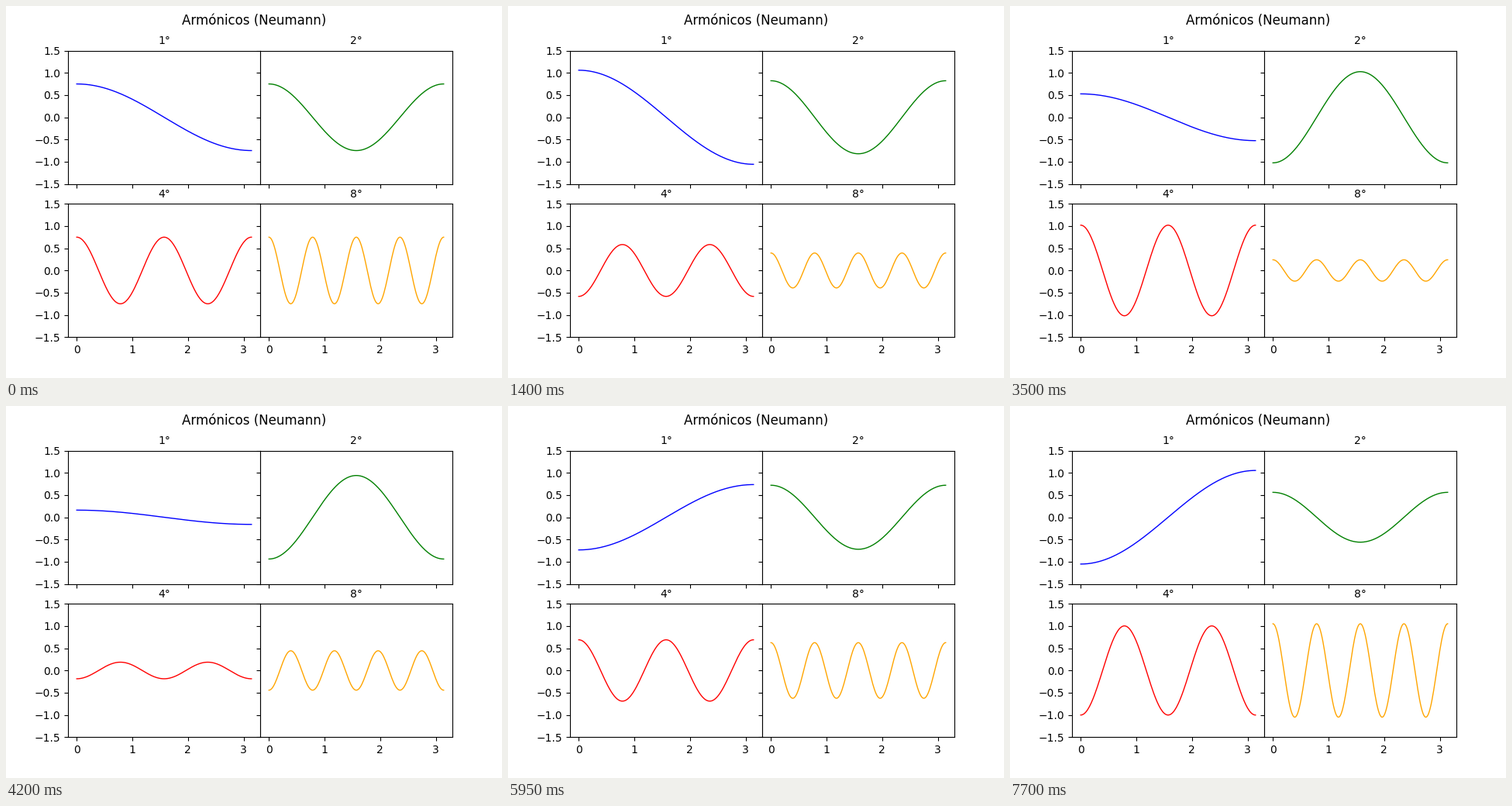
Animation of 640 by 480 pixels, one loop 8 s. Source, as a matplotlib script:

```python
import numpy as np
import matplotlib.pyplot as plt
from matplotlib.animation import FuncAnimation

plt.rcParams["font.family"] = "DejaVu Sans"

MODES = [(1, "blue"), (2, "green"), (4, "red"), (8, "orange")]
INTERVAL = 50        # ms per tick
TICKS_PER_STEP = 7   # the picture changes every 350 ms
FRAMES = 160
DT = 9 / 49          # time advanced per step
AMP = 0.75

x = np.linspace(0, np.pi, 200)


def wave(n, t):
    """Standing Neumann mode: zero slope at both ends."""
    return AMP * (np.cos(n * t) + np.sin(n * t)) * np.cos(n * x)


fig, axes = plt.subplots(2, 2, sharex=True, sharey=True, figsize=(6.4, 4.8),
                         dpi=100, gridspec_kw={"wspace": 0, "hspace": 0.15})
fig.suptitle("Armónicos (Neumann)", fontsize=12)

lines = []
for ax, (n, color) in zip(axes.flat, MODES):
    line, = ax.plot(x, wave(n, 0), color=color, linewidth=1)
    ax.set_title(f"{n}°", fontsize=10)
    ax.set_ylim(-1.5, 1.5)
    lines.append(line)


def update(frame):
    t = frame // TICKS_PER_STEP * DT
    for line, (n, _) in zip(lines, MODES):
        line.set_ydata(wave(n, t))
    return lines


anim = FuncAnimation(fig, update, frames=FRAMES, interval=INTERVAL,
                     repeat=True, repeat_delay=0)
plt.show()
```
